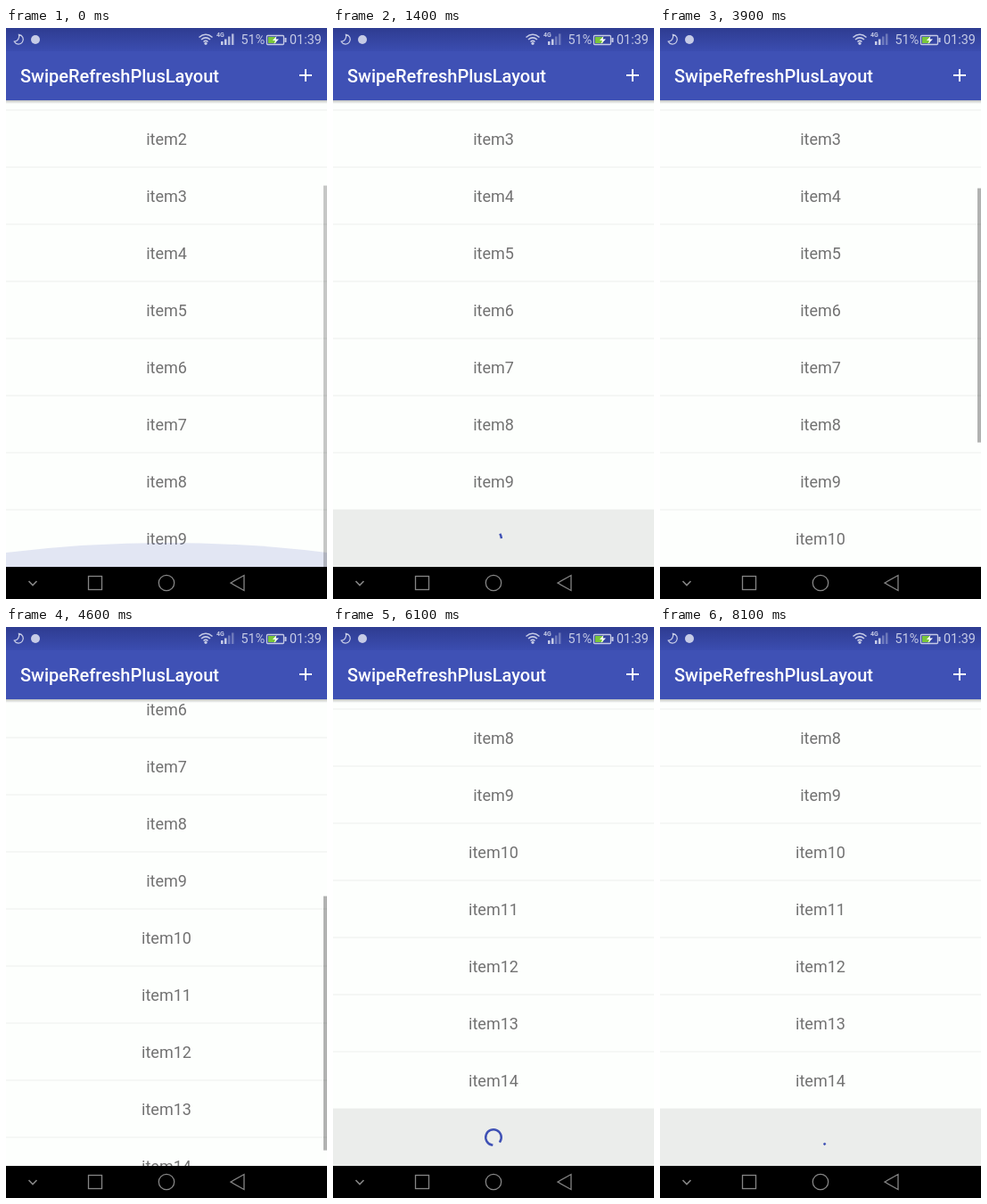
An HTML page that plays this animation: 360 by 640 pixels, repeating every 8200 ms.

```html
<!DOCTYPE html>
<html lang="en">
<head>
<meta charset="utf-8">
<title>Pull up to load more</title>
<style>
  html, body { margin: 0; width: 100%; height: 100%; overflow: hidden; background: #000; }
  svg { display: block; width: 360px; height: 640px; font-family: Roboto, "Noto Sans", sans-serif; }
  .item { font-size: 18px; fill: #727272; text-anchor: middle; }
  .status { font-size: 14.4px; fill: #c6cbe6; }
</style>
</head>
<body>
<svg viewBox="0 0 360 640" xmlns="http://www.w3.org/2000/svg">
  <defs>
    <linearGradient id="statusShade" x2="0" y2="1">
      <stop offset="0" stop-color="#2e3c91"/><stop offset="1" stop-color="#3b4db0"/>
    </linearGradient>
    <linearGradient id="shadow" x2="0" y2="1">
      <stop offset="0" stop-opacity=".24"/><stop offset="1" stop-opacity="0"/>
    </linearGradient>
  </defs>

  <rect width="360" height="640" fill="#fdfffd"/>
  <g id="list"></g>
  <g id="footer">
    <rect y="540" width="360" height="64" fill="#ebedeb"/>
    <path id="arc" fill="none" stroke="#3f51b5" stroke-width="2.5" stroke-linecap="square"/>
  </g>
  <path id="glow" fill="#3f51b5"/>
  <rect id="bar" x="356" width="4" fill="#000"/>

  <rect y="81" width="360" height="4" fill="url(#shadow)"/>
  <rect width="360" height="81" fill="#3f51b5"/>
  <rect width="360" height="26" fill="url(#statusShade)"/>
  <text x="16" y="61" font-size="20" font-weight="500" fill="#fff">SwipeRefreshPlusLayout</text>
  <path d="M329 53H343M336 46V60" stroke="#fff" stroke-width="2"/>

  <g fill="none" stroke="#c6cbe6" stroke-width="1.3">
    <path d="M14.5 7.5A5.3 5.3 0 1 1 9.3 15.2A6 6 0 0 0 14.5 7.5Z"/>
    <path d="M216.500 10.500Q224 4 231.500 10.500M219 13Q224 8.800 229 13M221.500 15.500Q224 13.400 226.500 15.500" stroke-width="1.6"/>
    <rect x="292.500" y="8.500" width="19" height="10" rx="1"/>
    <path d="M313.500 11V16" stroke-width="2"/>
  </g>
  <g fill="#c6cbe6">
    <circle cx="33" cy="13" r="5"/>
    <circle cx="224" cy="17.300" r="1.600"/>
    <rect x="241" y="15" width="2.500" height="4"/>
    <rect x="245" y="12.500" width="2.500" height="6.500"/>
    <g id="signal"><rect x="249" y="9.500" width="2.500" height="9.500"/><rect x="253" y="6.500" width="2.500" height="12.500"/></g>
    <text x="236" y="10" font-size="7" font-weight="700">4G</text>
  </g>
  <rect x="294" y="10" width="9" height="7" fill="#79c63c"/>
  <path d="M303.500 9L299 14H302L300.500 18L306 12.500H302.500Z" fill="#fff"/>
  <text class="status" x="263.500" y="18.300">51%</text>
  <text class="status" x="318" y="18.300">01:39</text>

  <rect y="604" width="360" height="36"/>
  <g fill="none" stroke="#858585" stroke-width="1.3">
    <path d="M25.500 620L30 624.500L34.500 620" stroke-width="1.600"/>
    <rect x="92.500" y="614.500" width="15" height="15"/>
    <circle cx="180" cy="622" r="8.700"/>
    <path d="M252 622L267 613.500V630.500Z"/>
  </g>
</svg>
<script>
const LOOP = 8200, STEP = 100, ROW = 64, TOP = 81, BOTTOM = 604, VIEW = BOTTOM - TOP;
const LOADED = 3850, SPIN_CYCLE = 1332;
const $ = id => document.getElementById(id);
const set = (el, attrs) => { for (const k in attrs) el.setAttribute(k, attrs[k]); };
const add = (parent, tag, attrs) => {
  const el = document.createElementNS("http://www.w3.org/2000/svg", tag);
  set(el, attrs);
  return parent.appendChild(el);
};
const progress = (t, from, to) => Math.min(1, Math.max(0, (t - from) / (to - from)));
const easeOut = p => 1 - (1 - p) ** 3;
const smooth = p => p * p * (3 - 2 * p);

// cubic-bezier(.4, 0, .2, 1)
function fastOutSlowIn(x) {
  let lo = 0, hi = 1;
  for (let i = 0; i < 20; i++) {
    const u = (lo + hi) / 2, v = 1 - u;
    if (1.2 * v * v * u + .6 * v * u * u + u ** 3 < x) lo = u; else hi = u;
  }
  return lo * lo * (3 - 2 * lo);
}

const rows = Array.from({ length: 15 }, (_, i) => {
  const row = add($("list"), "g", {});
  add(row, "text", { class: "item", x: 180, y: 38.7 }).textContent = "item" + i;
  add(row, "rect", { y: 63.5, width: 360, height: 1, fill: "#edf0ee" });
  return row;
});

function drawSpinner(elapsed) {
  const cycles = elapsed / SPIN_CYCLE, phase = cycles % 1, count = Math.floor(cycles);
  // The head sweeps 288 degrees, then the tail follows, while the ring turns.
  const base = -50 + cycles * 306 + count * 288;
  const head = base + 288 * fastOutSlowIn(Math.min(1, phase * 2)) + .5;
  const tail = base + 288 * fastOutSlowIn(Math.max(0, phase * 2 - 1));
  const point = deg => {
    const a = deg * Math.PI / 180;
    return `${180 + 8.75 * Math.cos(a)} ${572 + 8.75 * Math.sin(a)}`;
  };
  set($("arc"), { d: `M${point(tail)}A8.75 8.75 0 ${head - tail > 180 ? 1 : 0} 1 ${point(head)}` });
}

function draw(t) {
  const loaded = t >= LOADED;
  const count = loaded ? 15 : 10;
  const pull = ROW * smooth(loaded ? progress(t, 5200, 5450) : progress(t, 600, 1150));
  const scroll = loaded ? 181 + 256 * easeOut(progress(t, 4300, 4900)) : 117;

  rows.forEach((row, i) => set(row, {
    transform: `translate(0 ${TOP + i * ROW - scroll - pull})`,
    visibility: i < count ? "visible" : "hidden"
  }));

  set($("footer"), { transform: `translate(0 ${ROW - pull})` });
  const elapsed = t - (loaded ? 5436 : 1300);
  set($("arc"), { visibility: elapsed >= 0 ? "visible" : "hidden" });
  if (elapsed >= 0) drawSpinner(elapsed);

  const fade = 1 - progress(t, 0, 400);
  const peak = BOTTOM - 27 * fade, edge = peak + 11;
  set($("glow"), {
    d: `M0 ${BOTTOM}V${edge}Q180 ${peak - 11} 360 ${edge}V${BOTTOM}Z`,
    opacity: .14 * fade
  });

  const content = count * ROW;
  set($("bar"), {
    y: TOP + scroll * VIEW / content,
    height: VIEW * VIEW / content,
    opacity: loaded ? .3 * (1 - progress(t, 4900, 5200)) : .22 * fade
  });
  set($("signal"), { opacity: t < 600 ? .85 : .4 });
}

const start = performance.now();
function tick() {
  const t = (performance.now() - start) % LOOP;
  draw(Math.floor(t / STEP) * STEP);
  requestAnimationFrame(tick);
}
tick();
</script>
</body>
</html>
```
